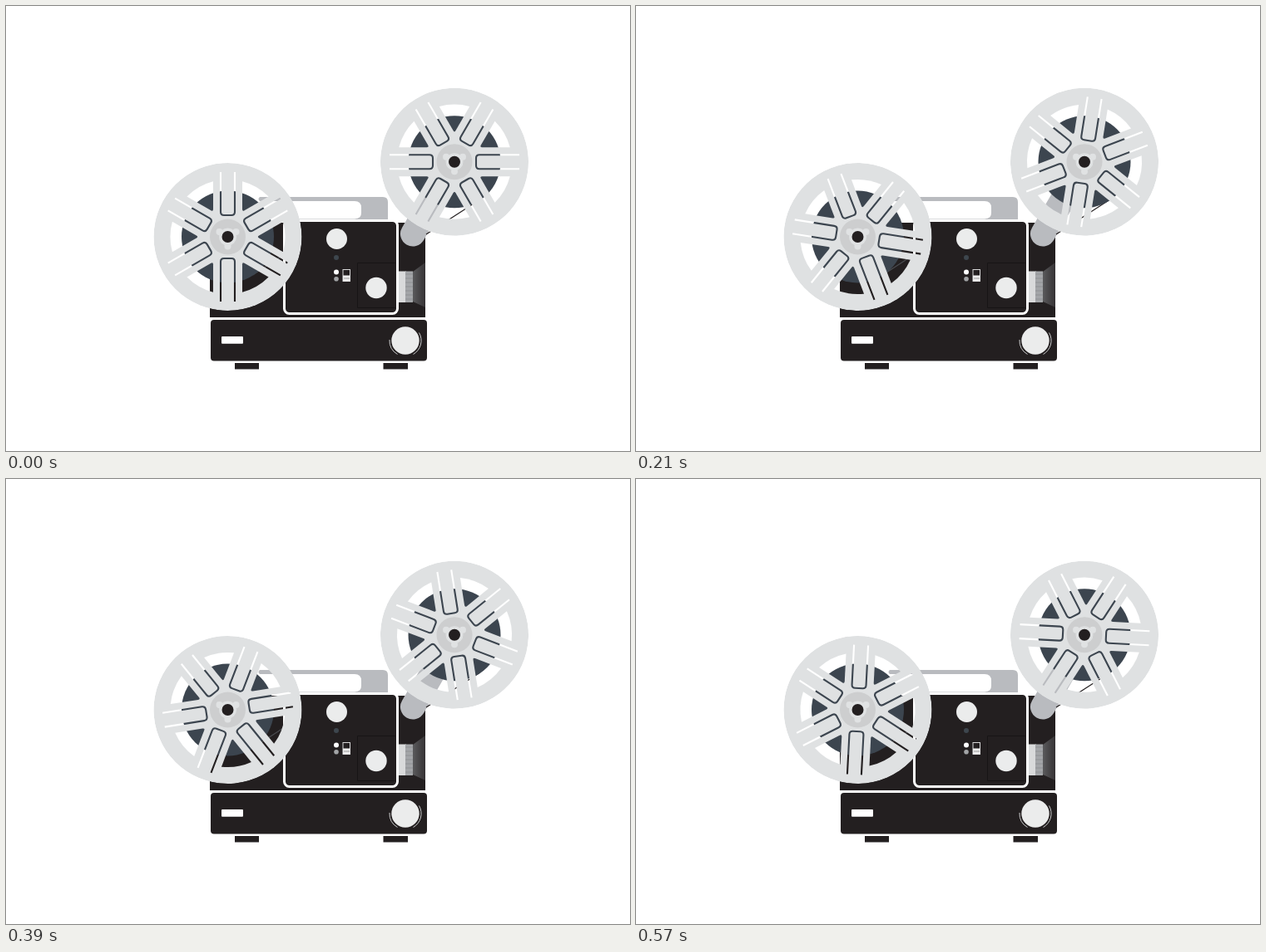
An HTML page for the animation above (0.6 s loop, 750 by 536 pixels).

```html
<!DOCTYPE html>
<html lang="en">
<head>
<meta charset="utf-8">
<title>Film projector</title>
<style>
  html, body { margin: 0; width: 100%; height: 100%; overflow: hidden; background: #fff; }
  svg { display: block; width: 100%; height: 100%; }
</style>
</head>
<body>
<svg viewBox="0 0 750 536">
  <defs>
    <linearGradient id="glow">
      <stop offset="0" stop-color="#5a5a5c"/>
      <stop offset="1" stop-color="#353234"/>
    </linearGradient>
    <mask id="holes" maskUnits="userSpaceOnUse" x="-90" y="-90" width="180" height="180">
      <circle r="89" fill="#fff"/>
      <g id="cuts"></g>
    </mask>
    <g id="wheel"><circle r="89" fill="#dfe1e2" mask="url(#holes)"/></g>
    <g id="hub">
      <circle r="21.5" fill="#cdcecf"/>
      <g fill="#e0e2e3">
        <circle r="10.5"/>
        <circle cx="-10" cy="-6" r="4"/>
        <circle cx="10" cy="-6" r="4"/>
        <circle cy="11.5" r="4"/>
      </g>
      <circle r="7" fill="#231f20"/>
    </g>
  </defs>

  <!-- handle -->
  <path fill="#b9bbbf" d="M305 230H453Q459 230 459 236V259H340V256.5H419Q427 256 427 249V243Q427 235 419 235H305Q302 232.500 305 230Z"/>

  <!-- body -->
  <g fill="#231f20">
    <path d="M245 261H504V376H245Z"/>
    <path d="M275 430H304V437.500H275ZM453.500 430H483V437.500H453.500Z"/>
    <rect x="246" y="378" width="260" height="49.500" rx="4"/>
  </g>
  <path d="M244 376.500H507" stroke="#fff" stroke-width="3"/>
  <path d="M489 320L504 309V363L489 356Z" fill="url(#glow)"/>
  <path d="M470 319.500H481V357H470Z" fill="#d9dadb"/>
  <path d="M480 319.500H489V357H480Z" fill="#a3a5a8"/>
  <path d="M480 323H489M480 328H489M480 333H489M480 338H489M480 343H489M480 348H489M480 353H489" stroke="#8f9194"/>

  <!-- front panel -->
  <rect x="334.500" y="258.500" width="136" height="112" rx="6" fill="#231f20" stroke="#fff" stroke-width="3"/>
  <path d="M468 309.500H422.500V363.500H468" fill="none" stroke="#171415"/>
  <g fill="#ebecec">
    <circle cx="397.500" cy="280.500" r="12.500"/>
    <circle cx="445" cy="339.500" r="12.700"/>
    <circle cx="480" cy="403" r="16.700"/>
  </g>
  <circle cx="397" cy="303" r="3" fill="#3d464d"/>
  <circle cx="397" cy="320.500" r="3" fill="#fff"/>
  <circle cx="397" cy="328.800" r="2.800" fill="#a2a4a6"/>
  <rect x="405" y="317.500" width="8.500" height="14" fill="none" stroke="#d8d8d8"/>
  <path d="M405 324.500H413.500V331.500H405Z" fill="#ececec"/>
  <path d="M406 328H413" stroke="#999"/>
  <rect x="259" y="398" width="26" height="8.700" rx="1" fill="#fff"/>
  <path d="M496.500 393.500A19 19 0 0 1 489.500 419.500M470.500 419.500A19 19 0 0 1 461 402" fill="none" stroke="#c9cacb"/>

  <!-- arm, film and reels -->
  <path d="M489 274.500L539 188" stroke="#b9bbbf" stroke-width="30" stroke-linecap="round"/>
  <path d="M505 275L569 233.500" stroke="#231f20" stroke-width="1.200"/>
  <path d="M296.500 324L334 299.500" stroke="#4a4c50" stroke-width="1.200"/>
  <g id="reels"></g>
</svg>
<script>
  const find = id => document.getElementById(id);
  const slot = 'M-8.5 -78V-30Q-8.5 -26 -4.5 -26H4.5Q8.5 -26 8.5 -30V-78';
  const gap = 'M-1.5 -37.6Q0 -35 1.5 -37.6L18.2 -66.6A69 69 0 0 0 -18.2 -66.6Z';

  for (let a = 0; a < 360; a += 60) {
    find('cuts').innerHTML +=
      `<path d="${slot}" transform="rotate(${a})" fill="none" stroke="#000" stroke-width="2.1"/>` +
      `<path d="${gap}" transform="rotate(${a + 30})"/>`;
  }

  const reels = [[266.5, 278, 0], [539, 187.7, 30]];
  find('reels').innerHTML = reels.map(([x, y]) =>
    `<g transform="translate(${x} ${y})"><circle r="55.5" fill="#3c454f"/>` +
    '<use class="spin" href="#wheel"/><use href="#hub"/></g>').join('');
  const wheels = document.querySelectorAll('.spin');

  // Both reels turn 3 degrees anticlockwise every 30 ms; the pattern repeats after 60.
  function draw() {
    const step = Math.floor(performance.now() % 600 / 30);
    wheels.forEach((w, i) => w.setAttribute('transform', `rotate(${reels[i][2] - 3 * step})`));
    requestAnimationFrame(draw);
  }
  draw();
</script>
</body>
</html>
```
